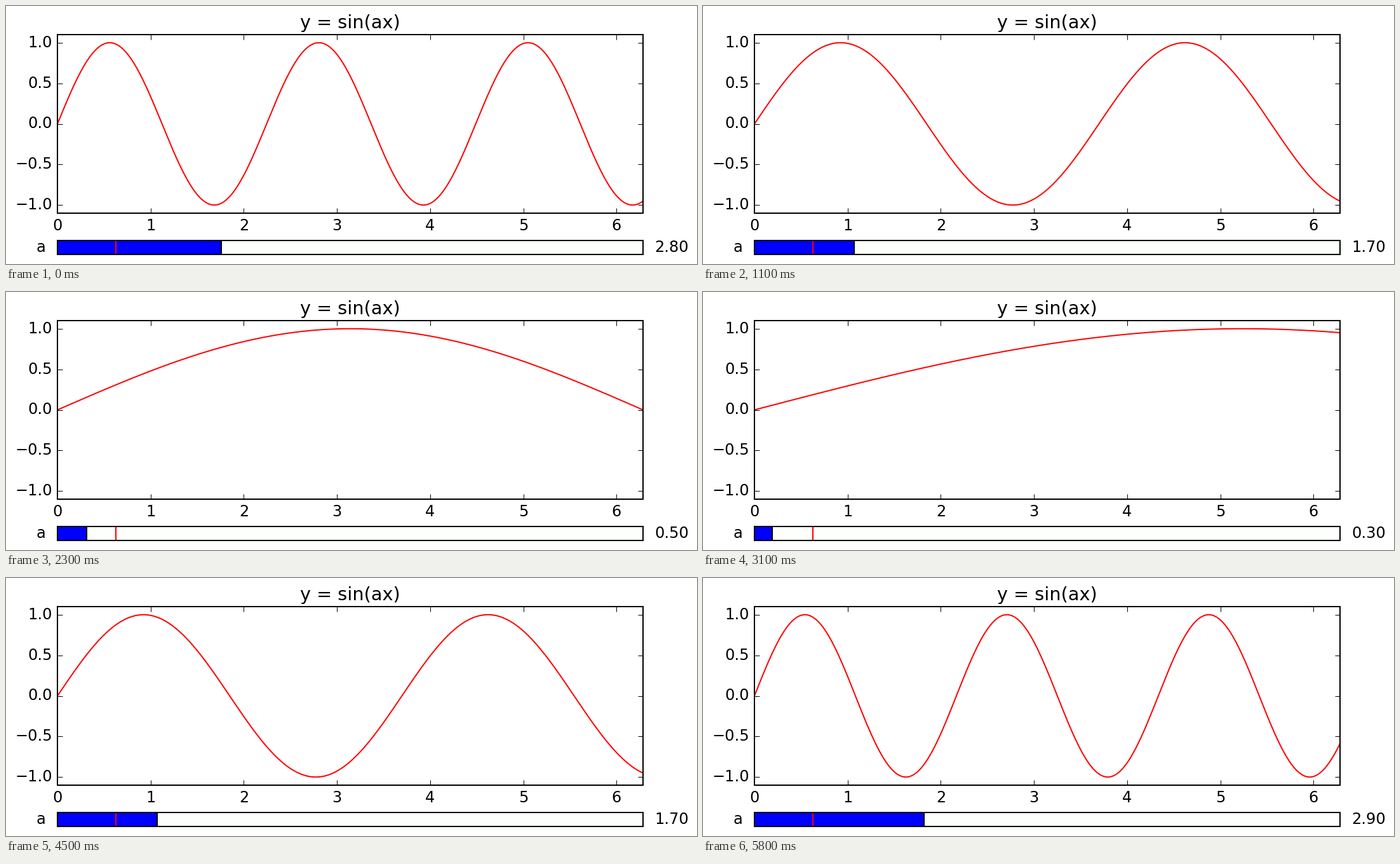
Animation of 1088 by 406 pixels, one loop 5.9 s. Source, as a matplotlib script:

```python
import numpy as np
import matplotlib.pyplot as plt
from matplotlib.animation import FuncAnimation

WIDTH, HEIGHT, DPI = 1088, 406, 128
PX = 72 / DPI  # one pixel in points
LEFT, RIGHT = 81, 1003
FRAMES, INTERVAL = 59, 100
A_MAX = 10
A_INIT = 1
A_TOP = 2.9
ZERO_FRAME = 28

plt.rcParams.update({
    "font.family": "DejaVu Sans",
    "font.size": 24 * PX,
    "axes.linewidth": 2 * PX,
    "ytick.alignment": "center",
})

fig = plt.figure(figsize=(WIDTH / DPI, HEIGHT / DPI), dpi=DPI, facecolor="white")


def add_panel(top, bottom, **options):
    """Add axes between two pixel rows counted from the top."""
    box = [LEFT / WIDTH, 1 - bottom / HEIGHT,
           (RIGHT - LEFT) / WIDTH, (bottom - top) / HEIGHT]
    return fig.add_axes(box, **options)


plot = add_panel(45, 326, xlim=(0, 2 * np.pi), ylim=(-1.1, 1.1),
                 xticks=range(7), yticks=np.linspace(-1, 1, 5))
plot.tick_params(direction="in", top=True, right=True,
                 length=8 * PX, width=PX, pad=8 * PX)
plot.text(0.5, 1 + 10 / 281, "y = sin(ax)", transform=plot.transAxes,
          ha="center", va="baseline", fontsize=28.8 * PX)
x = np.linspace(0, 2 * np.pi, 600)
curve, = plot.plot(x, np.zeros_like(x), color="red", lw=2 * PX)

slider = add_panel(369, 391, xlim=(0, A_MAX), ylim=(0, 1),
                   xticks=[], yticks=[], facecolor="#fcfffc")
bar = plt.Rectangle((0, 0), 0, 1, facecolor="blue", edgecolor="black", lw=2 * PX)
slider.add_patch(bar)
slider.axvline(A_INIT, color="red", lw=2 * PX)
slider.text(-0.02, 0.5, "a", transform=slider.transAxes, ha="right", va="center")
value = slider.text(1.02, 0.5, "", transform=slider.transAxes, ha="left", va="center")


def update(frame):
    a = min(abs(frame - ZERO_FRAME) / 10, A_TOP)
    curve.set_ydata(np.sin(a * x))
    bar.set_width(a)
    value.set_text(f"{a:.2f}")
    return curve, bar, value


animation = FuncAnimation(fig, update, frames=FRAMES, interval=INTERVAL,
                          repeat=True, repeat_delay=0, blit=False)
plt.show()
```
